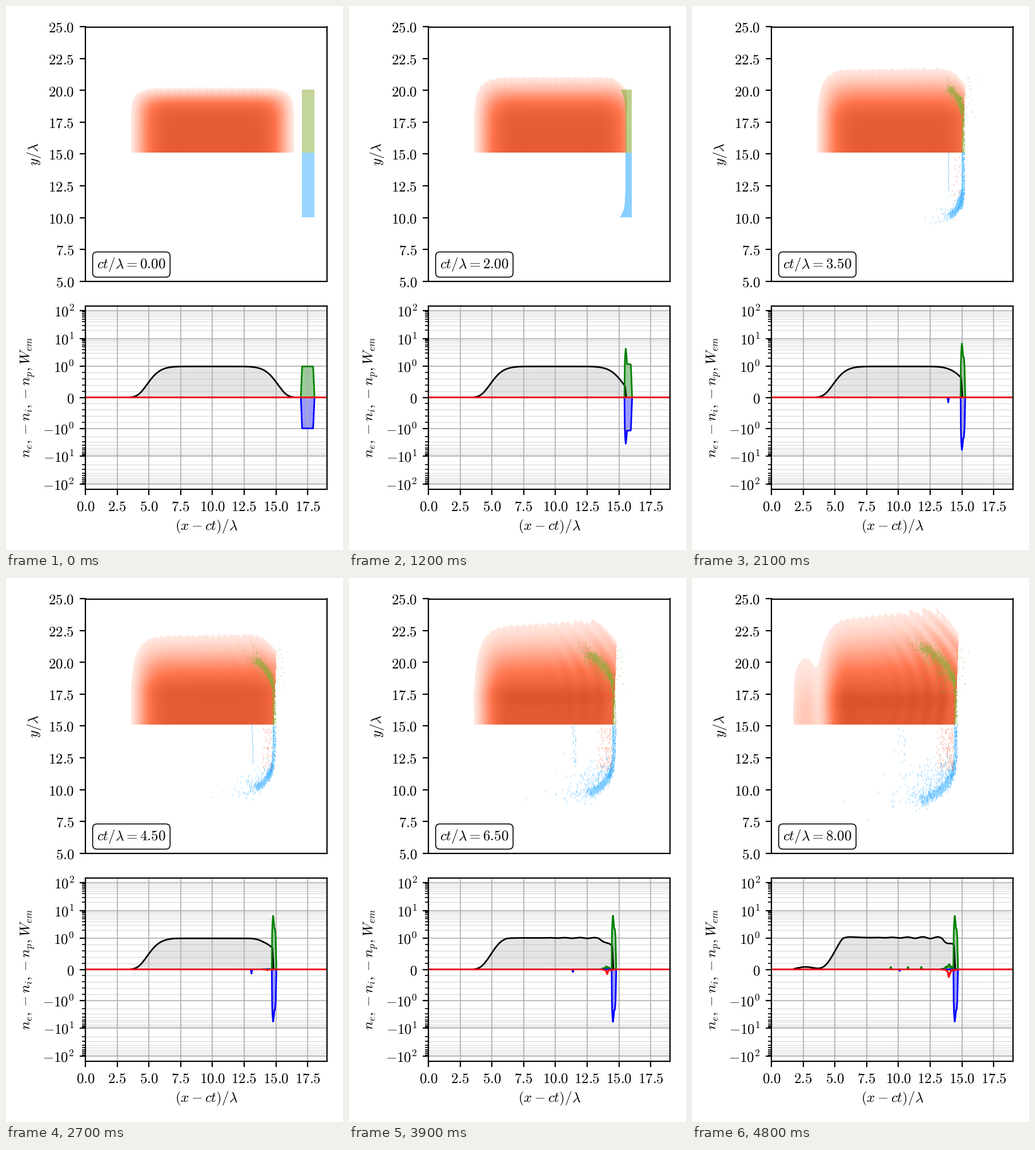
A matplotlib script for the animation above (9.8 s loop, 590x950 px).

```python
import numpy as np
import matplotlib.pyplot as plt
from matplotlib.animation import FuncAnimation
from matplotlib.colors import LinearSegmentedColormap
from matplotlib.patches import Polygon
from matplotlib.ticker import NullFormatter

W, H, DPI = 590, 950, 200
TICK_MS, LOOP_MS, STEP_MS, LAST = 50, 9800, 150, 32
MID = 15.08                      # symmetry axis of the map
NX, NY = 422, 222                # map cells
CUTOFF = 0.0065                  # weakest visible field energy

plt.rcParams.update({"mathtext.fontset": "cm", "font.size": 9,
                     "axes.linewidth": 0.8})

rng = np.random.default_rng(11)
X, Y = np.meshgrid((np.arange(NX) + 0.5) * 19 / NX,
                   5 + (np.arange(NY) + 0.5) * 20 / NY)
R = np.abs(Y - MID)
UPPER = Y > MID
GRAIN = rng.random((NY, NX))
LX = np.linspace(0, 19, 1521)
LNOISE = np.repeat(rng.random(LX.size // 6 + 1), 6)[:LX.size]

EMBER = np.array([255, 110, 80])
GREEN = np.array([135, 172, 55])
BLUE = np.array([51, 173, 255])
HEAT = LinearSegmentedColormap.from_list(
    "heat", [(0, "#fff7f4"), (0.67, "#ff764e"), (1, "#dc522a")])


def ramp(t, a, b):
    return float(np.clip((t - a) / (b - a), 0, 1))


def sigmoid(z):
    return 1 / (1 + np.exp(-np.clip(z, -40, 40)))


def bump(x, c, w):
    return np.exp(-((x - c) / w) ** 2)


# The foil flies at full speed, then is slowed and squeezed by the pulse.
def front(t):
    return max(17 - t, 14.25 + 1.8 * np.exp(-(t - 1) / 2.6))


def back(t):
    return max(18 - t, front(t) + 0.28)


def bend(t):
    return 1.4 * ramp(t, 1, 4.5) - 0.35 * ramp(t, 5, 8)


def reach(t):
    return 5 + 1.05 * ramp(t, 4.5, 8) ** 1.5


def pulse(x, r, t):
    """Field energy of the pulse at distance r from the axis."""
    late = ramp(t, 4, 8)
    power = 1 - 0.3 * ramp(t, 1, 2) * (x > 10)
    env = np.exp(-0.69 * (np.abs(x - 10) / 5) ** 8 * power)
    half, top = 3.96 + 0.04 * t, 5.09 + 0.425 * t
    n = np.log(7.3) / np.log(top / half)
    rr = np.maximum(r - 0.013 * ramp(t, 3, 8) * t * (x - 8) * r / 8, 0)
    w = env * np.exp(-0.69 * (rr / half) ** n)
    w = w * (1 + 0.18 * np.clip(r - top + 1, 0, 1) * np.cos(4 * np.pi * x))
    w = w + env * 0.17 * ramp(t, 1, 6) * bump(r, 3.55 - 0.2 * t, 0.75)
    w = w * (1 + 0.07 * late + 0.2 * ramp(t, 6, 8) * bump(x, 5.7, 0.9))
    # fringes behind the reflected front
    lit = sigmoid((x - (18 - 2 * t)) / 0.8)
    amp = lit * (0.08 * ramp(t, 5, 8) * sigmoid(x - 10.5)
                 + 0.5 * ramp(t, 2.5, 8) * sigmoid(x - 11)
                 * np.clip((r - 3) / 5, 0, 1))
    phase = 0.83 * (x - 10.7) + 0.07 * r * (r - 4.4)
    w = w * (1 + amp * np.cos(2 * np.pi * phase))
    w = w * (1 - 0.2 * ramp(t, 3, 8) * sigmoid((x - 13.8) / 0.2))
    # rounded upper corner next to the foil
    w = w * sigmoid((top - 1.3 - r + 1.5 * (front(t) - x)) / 0.25)
    # reflected light leaving on the left
    edge = 1.75 + 2 * (8 - t)
    lobe = 0.08 * sigmoid((x - edge) / 0.05) * bump(x, 2.7, 0.85)
    return w + ramp(t, 7, 7.25) * lobe * bump(r, 0, 3.3)


def stamp(img, x, dy, color, alpha, tall=2):
    ix = np.floor(x / 19 * NX).astype(int)
    iy = np.floor((MID + dy - 5) / 20 * NY).astype(int)
    for k in range(tall):
        ok = (ix >= 0) & (ix < NX) & (iy + k >= 0) & (iy + k < NY)
        a, b = iy[ok] + k, ix[ok]
        img[a, b] = img[a, b] * (1 - alpha) + color * alpha


class Cloud:
    """Loose particles of one half of the foil."""

    def __init__(self, sign, color, spread):
        self.sign, self.color, self.spread = sign, color, spread
        self.s = rng.random(800) ** 0.6
        self.g = rng.normal(size=(2, 800))
        self.hu = rng.random((2, 320))
        self.hg = rng.normal(size=(2, 320))
        self.he = rng.exponential(size=320)

    def draw(self, img, t):
        f, b, end = front(t), bend(t), reach(t)
        r = 3 + (end - 3) * self.s
        sd = 0.06 + 0.02 * t * (r / end) ** 3
        x = f + 0.13 - b * (r / 5) ** 5 + self.g[0] * sd
        stamp(img, x, self.sign * (r + self.g[1] * 0.025 * t), self.color, 0.4)
        on = self.hu[0] < ramp(t, 2, 8) ** 1.5
        r = 3.4 + 2.2 * self.hu[1][on] + 0.09 * t * self.hg[1][on]
        x = (f - b * (np.clip(r, 0, end) / 5) ** 5
             - self.he[on] * self.spread * t + 0.15 * self.hg[0][on])
        stamp(img, x, self.sign * r, self.color, 0.4)


clouds = [Cloud(1, GREEN, 0.06), Cloud(-1, BLUE, 0.13)]
specks = rng.random((2, 45))
embers = rng.random((3, 170))
trail = rng.random((2, 70))
ahead = rng.random((2, 28))


def draw_foil(img, t):
    power = 9 - 4 * ramp(t, 2.75, 4.5)
    shape = bend(t) * (R / 5) ** power
    lo = front(t) - shape
    hi = back(t) - shape * ramp(t, 2, 4.5)
    body = (X >= lo) & (X < hi) & (R < 5 - 0.9 * ramp(t, 2.75, 4))
    body &= GRAIN > 0.6 * ramp(t, 2.25, 4) * (X - lo) / (hi - lo)
    alpha = 0.5 + 0.15 * ramp(t, 1.25, 2.75) + 0.3 * ramp(t, 2, 4) * (GRAIN - 0.5)
    for half, color in ((UPPER, GREEN), (~UPPER, BLUE)):
        m = body & half
        a = alpha[m][:, None]
        img[m] = img[m] * (1 - a) + color * a


def draw_debris(img, t):
    for cloud in clouds:
        cloud.draw(img, t)
    on = embers[2] < ramp(t, 2, 8) ** 1.3
    x = front(t) - 0.08 - (0.25 + 0.13 * t) * embers[0][on] ** 1.7
    stamp(img, x, -0.3 - 3.3 * embers[1][on], EMBER, 0.4)
    x = back(t) + 0.03 - 0.28 * np.log(1 - 0.95 * ahead[0])
    stamp(img, x, 2.5 + 3.8 * ahead[1], GREEN, 0.45, 1)
    # thin layer left behind by the foil
    u, v = trail[:, :int(70 - 50 * ramp(t, 4, 8))]
    x = 16.9 - 0.85 * t + 0.12 * np.sin(2 * u) * ramp(t, 3, 5)
    stamp(img, x + (v - 0.5) * 0.7 * ramp(t, 5.5, 8), -3.1 * u, BLUE, 0.35)


def density_map(t):
    img = np.full((NY, NX, 3), 255.0)
    w = pulse(X, R, t)
    limit = front(t) + 0.08 + 0.04 * R * ramp(t, 1.5, 3)
    seen = UPPER & (w > CUTOFF) & (X < limit)
    img[seen] = 255 * HEAT(np.sqrt(w[seen]) / 1.1)[:, :3]
    if t < 4:
        stamp(img, 7 + 6 * specks[0] + 0.3 * t * specks[1],
              0.4 + 1.8 * specks[1], np.array([205, 82, 42]), 0.7, 1)
    draw_foil(img, t)
    if t >= 2.5:
        draw_debris(img, t)
    return np.clip(img, 0, 255).astype(np.uint8)


def foil_line(t, peak):
    f, b = front(t), back(t)
    base = 1 + 1.2 * ramp(t, 1.8, 3)
    px = [f - 0.04, f + 0.06, f + 0.16, b - 0.07, b + 0.04]
    return np.interp(LX, px, [0, peak, base, base, 0])


def lineouts(t):
    f = front(t)
    black = pulse(LX, np.zeros_like(LX), t)
    black = black * np.clip((f + 0.1 - LX) / 0.1, 0, 1)
    black[black < 0.004] = 0

    near = bump(LX, f - 0.35, 0.4)
    green = foil_line(t, 1 + 5.7 * ramp(t, 0.5, 3))
    green = green + 0.17 * ramp(t, 4, 8) * LNOISE * near
    for c in (9.4, 10.75, 11.8):
        green = green + 0.08 * ramp(t, 7, 8) * bump(LX, c, 0.05)
    blue = -foil_line(t, 1 + 5 * ramp(t, 0.9, 3))
    left = ramp(t, 2, 2.5) * (0.25 - 0.025 * t)
    blue = blue - left * bump(LX, 16.9 - 0.85 * t, 0.04)
    red = -0.25 * ramp(t, 3.5, 8) ** 1.5 * (
        0.75 * bump(LX, f - 0.4, 0.08) + 0.45 * LNOISE[::-1] * near)
    return black, green, blue, red


fig = plt.figure(figsize=(W / DPI, H / DPI), dpi=DPI, facecolor="white")


def panel(x0, y0, x1, y1):
    return fig.add_axes([x0 / W, 1 - y1 / H, (x1 - x0) / W, (y1 - y0) / H])


def label(x, y, s, **kw):
    return fig.text(x / W, 1 - y / H, s, ha="center", va="center", **kw)


top = panel(139, 36.5, 561.5, 480.5)
low = panel(139, 523.5, 561.5, 843.5)

picture = top.imshow(density_map(0), extent=(0, 19, 5, 25), origin="lower",
                     interpolation="nearest", aspect="auto")
yt = np.arange(5, 25.1, 2.5)
top.set_yticks(yt, [f"${v:.1f}$" for v in yt])
top.set_xticks([])

low.set_xlim(0, 19)
low.set_yscale("symlog", linthresh=1, linscale=1)
low.set_ylim(-150, 150)
xt = np.arange(0, 17.6, 2.5)
low.set_xticks(xt, [f"${v:.1f}$" for v in xt])
decades = [(s * 10 ** p, f"${'-' if s < 0 else ''}10^{p}$")
           for s in (-1, 1) for p in range(3)]
low.set_yticks(*zip((0, "$0$"), *decades))
minor = np.concatenate([np.arange(0.2, 0.9, 0.2), np.arange(2, 10),
                        np.arange(20, 100, 10)])
low.set_yticks(np.concatenate([-minor, minor]), minor=True)
low.yaxis.set_minor_formatter(NullFormatter())
low.grid(which="major", color="#b0b0b0", lw=0.8, alpha=0.8)
low.grid(which="minor", axis="y", color="#b0b0b0", lw=0.5, alpha=0.4)

label(49.5, 258.5, r"$y/\lambda$", rotation=90)
label(38.5, 683.5, r"$n_e, -n_i, -n_p, W_{em}$", rotation=90)
label(350.5, 909.5, r"$(x-ct)/\lambda$")
clock = label(219.5, 451.5, "", zorder=5,
              bbox=dict(boxstyle="round", fc="white", ec="black", lw=0.6))

fills, lines = [], []
for color, shade, alpha in (("black", "gray", 0.2), ("green", "green", 0.4),
                            ("blue", "blue", 0.4), ("red", "red", 0.4)):
    fill = Polygon([[0, 0], [1, 0], [1, 0]], closed=True, fc=shade, alpha=alpha,
                   lw=0, zorder=1)
    fills.append(low.add_patch(fill))
    lines += low.plot([], [], lw=1, color=color)

times = [k * 0.25 for k in range(LAST + 1)]
maps = [density_map(t) for t in times]
curves = [lineouts(t) for t in times]


def update(i):
    k = min(i * TICK_MS // STEP_MS, LAST)
    picture.set_data(maps[k])
    clock.set_text(rf"$ct/\lambda = {times[k]:.2f}$")
    for fill, line, v in zip(fills, lines, curves[k]):
        line.set_data(LX, v)
        fill.set_xy(np.column_stack([np.r_[0, LX, 19], np.r_[0, v, 0]]))
    return [picture, clock, *fills, *lines]


anim = FuncAnimation(fig, update, frames=LOOP_MS // TICK_MS, interval=TICK_MS,
                     init_func=lambda: update(0), repeat=True, repeat_delay=0)
plt.show()
```
